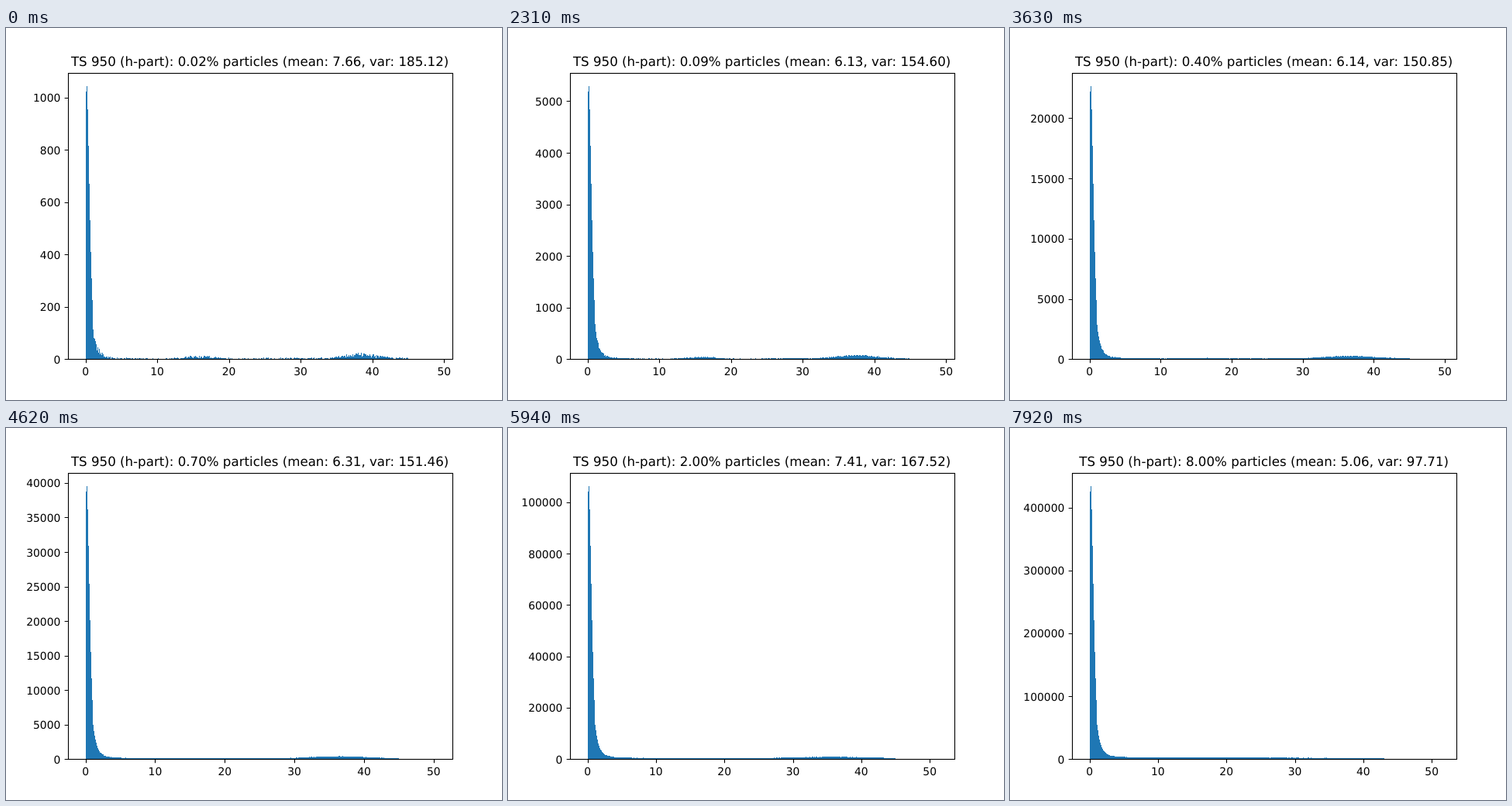
Write an HTML page that moves like this. It is 640 px wide and 480 px high and loops after 8 s.

```html
<!DOCTYPE html>
<html lang="en">
<head>
<meta charset="utf-8">
<title>Particle histogram</title>
<style>
  html, body { margin: 0; width: 100%; height: 100%; overflow: hidden; background: #fff; }
  svg { display: block; width: 640px; height: 480px; }
  text { font: 13.889px "DejaVu Sans", sans-serif; fill: #000; text-rendering: geometricPrecision; }
  #title { font-size: 16.667px; text-anchor: middle; }
  #xLabels { text-anchor: middle; }
  #yLabels { text-anchor: end; }
  #bars { fill: #1f77b4; shape-rendering: crispEdges; }
  #ticks, #frame { fill: none; stroke: #000; stroke-width: 1.11; }
</style>
</head>
<body>
<svg viewBox="0 0 640 480" xmlns="http://www.w3.org/2000/svg">
  <rect width="640" height="480" fill="#fff"/>
  <path id="bars"/>
  <path id="ticks"/>
  <rect id="frame" x="80.5" y="58.5" width="496" height="369"/>
  <g id="xLabels"></g>
  <g id="yLabels"></g>
  <text id="title" x="327.6" y="49"></text>
</svg>
<script>
const STEP = 330, LOOP = 8000;
const LEFT = 102.545, WIDTH = 450.909, BASE = 427.2, HEIGHT = 369.6, PEAK = HEIGHT / 1.05;

const STATS = [
  { pct: 0.02, peak: 1042.4, mean: 7.66, variance: 185.12 },
  { pct: 0.06, peak: 3391, mean: 6.61, variance: 165.38 },
  { pct: 0.09, peak: 5290, mean: 6.13, variance: 154.60 },
  { pct: 0.4, peak: 22658, mean: 6.14, variance: 150.85 },
  { pct: 0.7, peak: 39522, mean: 6.31, variance: 151.46 },
  { pct: 2, peak: 106280, mean: 7.41, variance: 167.52 },
  { pct: 8, peak: 433640, mean: 5.06, variance: 97.71 }
];

const el = id => document.getElementById(id);
const bell = (x, mid, sd) => Math.exp(-(((x - mid) / sd) ** 2) / 2);
const snap = v => Math.floor(v + 0.5) + 0.5;

// Hundredths, then tenths, then whole percents
function percentAt(step) {
  if (step < 8) return (step + 2) / 100;
  return step < 17 ? (step - 7) / 10 : step - 16;
}

// Largest distance found so far
function rangeAt(step) {
  if (step < 9) return 48.73;
  if (step < 10) return 49.05;
  if (step < 14) return 49.17;
  return step < 18 ? 50.18 : 51.05;
}

function statsAt(pct) {
  const i = Math.max(1, STATS.findIndex(s => pct <= s.pct));
  const a = STATS[i - 1], b = STATS[i], f = (pct - a.pct) / (b.pct - a.pct);
  const mix = key => a[key] + (b[key] - a[key]) * f;
  return { peak: mix("peak"), mean: mix("mean"), variance: mix("variance") };
}

function random(seed) {
  let s = seed * 7919 + 17;
  return () => {
    s = (s + 0x6D2B79F5) | 0;
    let t = Math.imul(s ^ (s >>> 15), 1 | s);
    t = (t + Math.imul(t ^ (t >>> 7), 61 | t)) ^ t;
    return ((t ^ (t >>> 14)) >>> 0) / 4294967296;
  };
}

// Smallest round interval that leaves at most nine divisions
function tickInterval(max) {
  const raw = max / 9, unit = 10 ** Math.floor(Math.log10(raw));
  return unit * [1, 2, 2.5, 5, 10].find(m => m * unit >= raw);
}

// Height in pixels of the steep part near zero
function headHeight(i) {
  const k = i ? i - 1 : 0.35;
  return PEAK * Math.exp(-0.089 * k ** 1.46);
}

// Returns the height beyond the head; the two bumps flatten as the sample grows
function tailProfile(pct, scale) {
  const s = Math.log10(pct / 0.02), left = Math.max(0, 1 - s / Math.log10(400));
  const floor = 0.45 + 0.25 * s * s;
  const low = 3 * Math.exp(-0.8 * s * s);
  const high = 5 * left ** 0.7, mid = 38.3 - 1.3 * s, spread = 2.3 + 0.75 * s * s;
  return i => {
    const u = i / scale, k = i - 9;
    return 39 * Math.exp(-k / 4.5) + 4 * Math.exp(-k / 20)
      + floor * (1 - 0.3 * u / 45)
      + low * (bell(u, 16, 1.8) + (u > 24 ? 0.2 : 0))
      + high * bell(u, mid, spread);
  };
}

function barsPath(step, pct, scale, perPixel) {
  const rnd = random(step + 1), tail = tailProfile(pct, scale);
  const count = Math.round(Math.min(45, 45.67 - pct / 3) * scale);
  let d = "M103 427";
  for (let i = 0; i < count; i++) {
    let h = i < 9 ? headHeight(i) : tail(i);
    if (i >= 9) {
      const noise = (rnd() + rnd() + rnd() + rnd() - 2) * 1.73;
      h = Math.max(0, h + noise * Math.sqrt(h / perPixel));
    }
    d += `V${Math.min(427, Math.round(BASE - h))}h1`;
  }
  return d + "V427Z";
}

function draw(step) {
  const pct = percentAt(step), { peak, mean, variance } = statsAt(pct);
  const yMax = peak * 1.05, scale = WIDTH / rangeAt(step);
  let ticks = "", xs = "", ys = "";
  for (let v = 0; v <= 50; v += 10) {
    const x = LEFT + v * scale;
    ticks += `M${snap(x)} 427.5v4.86`;
    xs += `<text x="${x.toFixed(2)}" y="448">${v}</text>`;
  }
  const gap = tickInterval(yMax);
  for (let v = 0; v <= yMax; v += gap) {
    const y = BASE - v / yMax * HEIGHT;
    ticks += `M80.5 ${snap(y)}h-4.86`;
    ys += `<text x="70.3" y="${Math.floor(y) + 6}">${Math.round(v)}</text>`;
  }
  el("bars").setAttribute("d", barsPath(step, pct, scale, yMax / HEIGHT));
  el("ticks").setAttribute("d", ticks);
  el("xLabels").innerHTML = xs;
  el("yLabels").innerHTML = ys;
  el("title").textContent = `TS 950 (h-part): ${pct.toFixed(2)}% particles ` +
    `(mean: ${mean.toFixed(2)}, var: ${variance.toFixed(2)})`;
}

let start = null, shown = -1;
function tick(now) {
  if (start === null) start = now;
  const step = Math.floor(((now - start) % LOOP) / STEP);
  if (step !== shown) draw(shown = step);
  requestAnimationFrame(tick);
}
draw(0);
requestAnimationFrame(tick);
</script>
</body>
</html>
```
